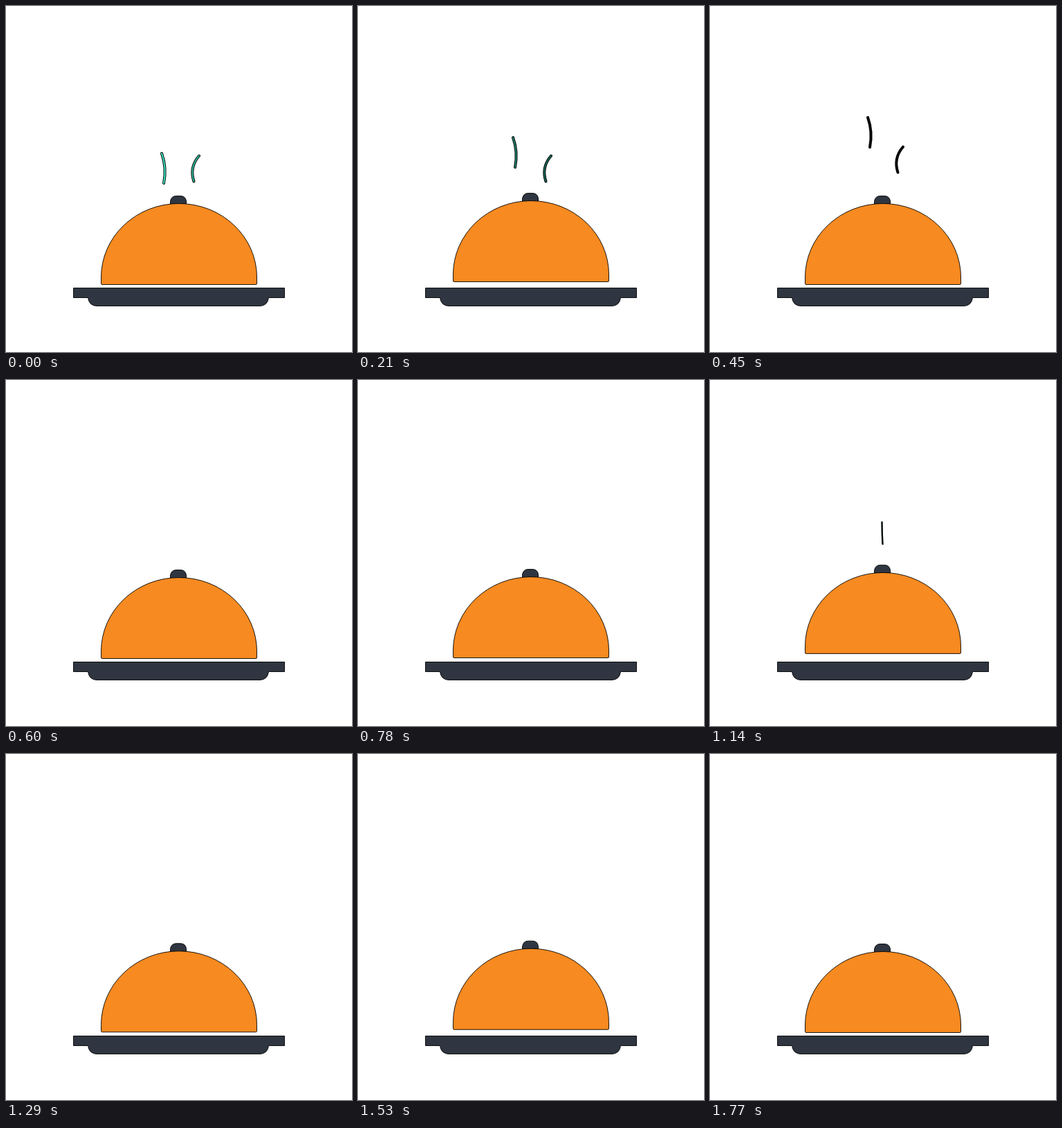
These frames come from a looping animation (500 by 500 pixels, 1920 ms). An HTML page with a canvas:

```html
<!DOCTYPE html>
<html lang="en">
<head>
<meta charset="utf-8">
<title>Serving dish</title>
<style>
html, body { margin: 0; width: 100%; height: 100%; overflow: hidden; background: #fff; }
canvas { display: block; width: 500px; height: 500px; }
</style>
</head>
<body>
<canvas id="stage" width="500" height="500"></canvas>
<script>
const ctx = document.getElementById('stage').getContext('2d');
const LOOP = 1920, STEP = 30, LAST = 1770;
const DARK = '#2f3641', ORANGE = '#f78a20', TEAL = [56, 220, 186];

const clamp = v => Math.max(0, Math.min(1, v));
const smooth = v => { v = clamp(v); return v * v * (3 - 2 * v); };

// Up and down again between two times
function hop(t, from, to, height) {
  const half = (to - from) / 2;
  return height * smooth(1 - Math.abs(t - from - half) / half);
}

function lift(t) {
  return hop(t, 0, 430, 4) + hop(t, 720, 1340, 10) + hop(t, 1380, LAST, 5);
}

function shape(path, fill) {
  ctx.fillStyle = fill;
  ctx.fill(path);
  ctx.strokeStyle = '#000';
  ctx.lineWidth = 0.9;
  ctx.stroke(path);
}

const tray = new Path2D('M97.5 407.5H402.5V421.5H379.5Q378 433 367 433.5H131Q120 433 118.5 421.5H97.5Z');
const knob = new Path2D('M237.5 287V282Q239 274.5 246 274.5H252Q259.5 274.5 260.5 282V287Z');
const dome = new Path2D('M137.5 392A112.5 106.5 0 0 1 362.5 392V401Q362.5 402.5 361 402.5H139Q137.5 402.5 137.5 401Z');
const wispLeft = new Path2D('M225 213Q232.5 234 228 256');
const wispRight = new Path2D('M279 216.5Q264.7 233 271.5 253.5');
const wispMid = new Path2D('M248.5 213.5Q248.5 230 249.5 245');

function wisp(path, x, y, glow, width) {
  ctx.save();
  ctx.translate(x, y);
  ctx.lineCap = 'round';
  ctx.strokeStyle = '#000';
  ctx.lineWidth = width;
  ctx.stroke(path);
  ctx.strokeStyle = `rgb(${TEAL.map(c => Math.round(c * clamp(glow))).join(',')})`;
  ctx.lineWidth = width * 0.55;
  ctx.stroke(path);
  ctx.restore();
}

function steam(t) {
  if (t <= 480) {
    const sway = t * (t * 4.76e-5 - 0.01476);
    const rise = t * (t * 2.5e-5 + 0.1042);
    wisp(wispLeft, sway, -rise, 1 - t / 470, 4);
    wisp(wispRight, 0, -Math.max(0, t - 340) * 0.118, 0.78 * (1 - t / 480), 4);
  }
  if (t >= 930 && t <= 1170) {
    wisp(wispMid, 0, -(t - 1020) * 0.067, 0.45 * (1 - (t - 1020) / 170), 2.4);
  }
}

function draw(t) {
  ctx.fillStyle = '#fff';
  ctx.fillRect(0, 0, 500, 500);
  shape(tray, DARK);
  steam(t);
  ctx.save();
  ctx.translate(0, -lift(t));
  shape(knob, DARK);
  shape(dome, ORANGE);
  ctx.restore();
}

const start = performance.now();
function tick() {
  const t = (performance.now() - start) % LOOP;
  draw(Math.min(LAST, Math.floor(t / STEP) * STEP));
  requestAnimationFrame(tick);
}
tick();
</script>
</body>
</html>
```
